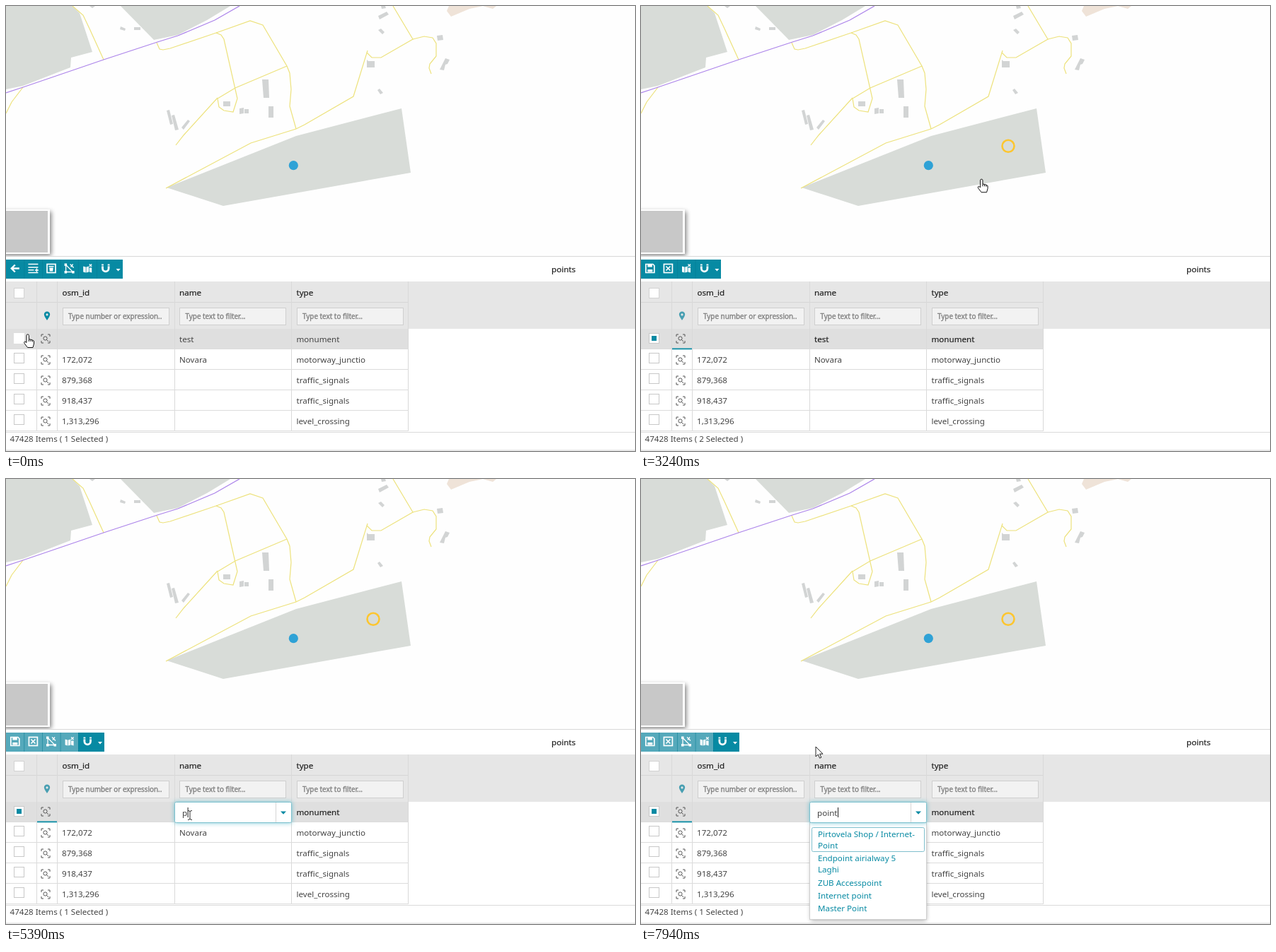
Animation of 889x630 px, one loop 8000 ms. Source, as an HTML page:

```html
<!DOCTYPE html>
<html lang="en">
<head>
<meta charset="utf-8">
<title>Points table</title>
<style>
html, body { margin: 0; width: 100%; height: 100%; overflow: hidden; background: #fefefe; }
svg { display: block; }
text { font: 11.6px "Noto Sans", "Open Sans", sans-serif; fill: #444; white-space: pre; }
.dark { fill: #222; stroke: #222; stroke-width: .2px; }
.hint { font-size: 9.9px; fill: #808080; stroke: #808080; stroke-width: .35px; }
.tip { font-size: 10px; fill: #fff; text-anchor: middle; }
.teal { fill: #078aa3; }
.land { fill: #d8dcd8; }
.house { fill: #d2d4d4; }
.road { fill: none; stroke: #ede27c; stroke-width: 1.2; }
.icon { fill: none; stroke: #fff; stroke-width: 1.7; }
.icon .solid { fill: #fff; stroke: none; }
</style>
</head>
<body>
<svg width="889" height="630" viewBox="0 0 889 630">
<defs>
  <filter id="blur" x="-50%" y="-50%" width="200%" height="200%"><feGaussianBlur stdDeviation="3"/></filter>
</defs>
<g id="base"></g>
<g id="live"></g>
</svg>
<script>
const LOOP = 8000, TEAL = '#078aa3', PALE = '#55a9bb';
const base = document.getElementById('base');
const live = document.getElementById('live');

const rect = (x, y, w, h, fill, extra = '') =>
  `<rect x="${x}" y="${y}" width="${w}" height="${h}" fill="${fill}" ${extra}/>`;
const box = (x, y, w, h, fill, stroke) => rect(x + .5, y + .5, w - 1, h - 1, fill, `stroke="${stroke}"`);
const text = (x, y, s, cls = '') => `<text x="${x}" y="${y}" class="${cls}">${s}</text>`;
const path = (d, attrs) => `<path d="${d}" ${attrs}/>`;
const circle = (x, y, r, attrs) => `<circle cx="${x}" cy="${y}" r="${r}" ${attrs}/>`;
const at = (x, y, s, attrs = '') => `<g transform="translate(${x} ${y})" ${attrs}>${s}</g>`;
const between = (t, a, b) => t >= a && t < b;
const clamp = v => Math.max(0, Math.min(1, v));

// ---------- still parts ----------
const land = [
  'M0 0H94L104 10L122 65L92 73L91 87L24 113L0 118Z',
  'M162 0L209 48L243 41L284 20L317 0Z',
  'M227 257L410 184L559 145L572 236L307 283Z'
];
const roads = [
  'M0 152L8 136L24 115',
  'M94 0L109 13L118 32L138 76',
  'M213 52L217 61L222 62L232 60L297 38L345 21L363 27L397 85L401 95L403 118L401 142L410 174',
  'M297 38L304 41L308 47L327 131L321 150L308 148L301 143L299 131L324 116L397 85',
  'M240 197L251 183L299 130',
  'M226 258L346 194L410 174L422 168L491 128L511 63',
  'M510 66L517 73H530L575 47L547 0',
  'M575 47L591 43L603 45L608 53V71L599 82L598 88L601 96'
];
const houses = 'M362 104h9l1 26h-8zM307 135h10v7h-10zM330 145l6-1v8l-6 1zM337 146h6v6h-6z' +
  'M371 142h7v16h-7zM227 148l4-1 5 20-4 1zM234 155l4-1 6 21-5 1zM257 161l3 2-9 12-3-3z' +
  'M162 29l7 3-1 3-7-2zM181 30h9v4h-9zM118 0h8l-4 3zM510 76l2 2h9v9h-11zM525 119l3-2 5 6-4 2z' +
  'M526 14l12-6 3 4-13 7zM530 0h6l1 3-6 1zM526 34l4-2 5 5-3 3zM609 42l8-1 1 7-8 1z' +
  'M621 74l6 2-3 6-3 1-2 8-6-1z';

const zoomIcon = (x, y) => at(x, y,
  path('M-6-3V-6H-3M3-6H6V-3M6 3V6H3M-3 6H-6V3M1.4 1.4L4 4', '') + circle(-.5, -.5, 2.6, ''),
  'fill="none" stroke="#555"');

function still() {
  let s = land.map(d => path(d, 'class="land"')).join('');
  s += path('M623 7L629 15L655 4L674 0L688 4L693 0H626Z', 'fill="#efe3d8"');
  s += path(houses, 'class="house"');
  s += roads.map(d => path(d, 'class="road"')).join('');
  s += path('M0 123L24 115L138 76L214 51L243 42L295 20L330 0', 'fill="none" stroke="#ac84ea" stroke-width="1.3"');
  s += rect(-4, 291, 68, 62, '#000', 'opacity=".5" filter="url(#blur)"');
  s += rect(0, 288, 62, 63, '#fff') + rect(0, 290, 59, 59, '#c8c8c8');

  s += rect(0, 354, 889, 276, '#fff') + rect(0, 354, 889, 1, '#d8d8d8');
  s += text(771, 377, 'points', 'dark');
  s += rect(0, 390, 889, 67, '#e6e6e6') + rect(0, 457, 569, 29, '#dfdfdf');
  s += rect(0, 419, 569, 1, '#d6d6d6');
  for (const x of [43, 72, 238, 403, 568]) s += rect(x, 390, 1, 212, '#d9d9d9');
  for (let y = 485; y < 603; y += 29) s += rect(0, y, 569, 1, '#dcdcdc');
  s += box(11, 399, 15, 15, '#fff', '#d2d2d2');
  [[80, 'osm_id', 'Type number or expression..'], [245.5, 'name', 'Type text to filter...'],
   [411, 'type', 'Type text to filter...']].forEach(([x, title, hint]) => {
    s += text(x - .5, 410, title, 'dark');
    s += box(Math.floor(x), 427, 151, 25, '#f2f2f2', '#cfcfcf') + text(x + 8, 443, hint, 'hint');
  });
  [['172,072', 'Novara', 'motorway_junctio'], ['879,368', '', 'traffic_signals'],
   ['918,437', '', 'traffic_signals'], ['1,313,296', '', 'level_crossing']].forEach((row, i) => {
    const y = 505 + 29 * i;
    [79, 245, 410.5].forEach((x, k) => s += text(x, y, row[k]));
    s += box(11, y - 14, 15, 15, '#fff', '#c8c8c8') + zoomIcon(56, y - 4);
  });
  s += zoomIcon(56, 471);
  s += rect(0, 603, 889, 1, '#dadada') + rect(0, 628, 889, 2, '#e9e9e9');
  return s;
}

// ---------- toolbar ----------
const icons = {
  back: path('M6 0H-5M0-5L-5 0L0 5', 'stroke-width="2.4"'),
  add: path('M-7-6H7M-7-1.5H7M-7 6H7M-7 2.3H1M5 0V5M2.5 2.5H7.5', 'stroke-width="1.5"'),
  trash: rect(-6, -6, 12, 12, 'none') + path('M-3.5-3.5H3.5V-2H-3.5ZM-2.8-1H2.8L2.2 4H-2.2Z', 'class="solid"'),
  shape: path('M-5-5V5H5L-5-5M1-6L6-1M5-6L2-2', 'stroke-width="1.3"') +
    path('M-7-7h3.5v3.5h-3.5zM-7 3.5h3.5V7h-3.5zM3.5 3.5H7V7H3.5z', 'class="solid"'),
  map: path('M-6-3L-2.5-2V6L-6 5ZM-1.7-2L1.7-3V5L-1.7 6ZM2.5-1H6V6L2.5 5Z', 'class="solid"') +
    path('M2.5-6L6-2.5M6-6L2.5-2.5', 'stroke-width="1.3"'),
  magnet: path('M-4.3-6V0A4.3 4.3 0 0 0 4.3 0V-6', 'stroke-width="2.8"') +
    path('M-6-3.6H-2.5M2.5-3.6H6', `stroke="${TEAL}" stroke-width="1"`),
  save: path('M-6-6H4L6-4V6H-6Z', '') + path('M-3.5-6H3V-2H-3.5ZM-3.5 1.5H3.5V5H-3.5Z', 'class="solid"'),
  close: rect(-6, -6, 12, 12, 'none') + path('M-3-3L3 3M3-3L-3 3', '')
};

function toolbar(names, pale) {
  const end = names.length * 25.6, w = Math.round(end + 11);
  let s = rect(0, 359, w, 27, TEAL);
  if (pale) s += rect(0, 359, end - 26, 27, PALE);
  for (let i = 1; i < names.length; i++) s += rect(i * 25.6, 359, .5, 27, '#067a91');
  s += names.map((n, i) => at(12.8 + i * 25.6, 371.5, icons[n], 'class="icon"')).join('');
  return s + path(`M${end + 2} 372h6l-3 3.5z`, 'fill="#fff"');
}

function toolsAt(t) {
  if (t < 470) return toolbar(['back', 'add', 'trash', 'shape', 'map', 'magnet']);
  if (t < 2880) return toolbar(['back', 'add', 'trash', 'map', 'magnet']);
  if (t < 4660) return toolbar(['save', 'close', 'map', 'magnet']);
  return toolbar(['save', 'close', 'shape', 'map', 'magnet'], true);
}

// ---------- pointer ----------
const track = [
  [70, 31, 465], [240, 18, 467], [1020, 18, 467], [1250, 330, 300], [1400, 480, 220],
  [1490, 454, 214], [1820, 406, 224], [2080, 406, 224], [2440, 508, 200], [2570, 519, 196],
  [3170, 519, 196], [3500, 345, 425], [3770, 288, 468], [3910, 270, 489], [3980, 270, 489],
  [4260, 258, 476], [7600, 258, 476], [7900, 247, 379]
];
function pointer(t) {
  const i = track.findIndex(k => k[0] > t);
  if (i === 0) return track[0].slice(1);
  if (i < 0) return track[track.length - 1].slice(1);
  const [a, x, y] = track[i - 1], [b, u, v] = track[i], p = (t - a) / (b - a);
  return [x + (u - x) * p, y + (v - y) * p];
}

const hand = path('M-2 9V1.6A1.7 1.7 0 0 1 1.4 1.6V6.8L4 7.2L6.5 8L8.5 9.3V13L7 18.5H-.5L-5 12.6Q-6 10.3-4.3 10L-2 11.5ZM1.4 7V10M4 7.5V10M6.4 8.3V10.5',
  'fill="#fff" stroke="#111" stroke-linejoin="round"');
const arrow = path('M0 0V14L3.3 11L5.6 16.2L7.8 15.2L5.6 10.2H10Z', 'fill="#fff" stroke="#222"');
const beam = path('M-3-6.5Q0-6.5 0-5Q0-6.5 3-6.5M0-5V5M-3 6.5Q0 6.5 0 5Q0 6.5 3 6.5', 'fill="none" stroke="#333"');

const presses = [[240, 340], [2020, 2570], [4460, 4540], [4600, 4660]];
function cursor(t) {
  const [x, y] = pointer(t);
  let s = '';
  if (presses.some(p => between(t, ...p)))
    s += circle(x, y + (t > 4000 ? -3 : 1), 9.5, 'fill="#f2e92a" opacity=".72"');
  const editing = t >= 4660;
  if (editing && y > 457) return s + at(x + 2, y, beam);
  return s + at(x, y, editing ? arrow : hand);
}

// ---------- map points ----------
function points(t) {
  const dot = circle(406.3, 225.7, 6.6, `fill="#2fa2d6"`);
  if (t < 540) return dot;
  const ring = (x, y, fill) => circle(x, y, 8.5, `fill="${fill}" stroke="#fdc62f" stroke-width="2.6"`);
  if (t >= 2880) return dot + ring(519, 198.3, 'none');
  if (t < 2080) return ring(405.7, 228, 'rgba(255,255,255,.7)') + circle(406.3, 226.5, 6.4, 'fill="#45a9dc"');
  const [x, y] = pointer(t - 40);
  return dot + ring(x, y + 2, 'rgba(255,255,255,.55)') +
    circle(x, y + 2, 4.6, 'fill="#1d8fe6" stroke="#fff" stroke-width="1.2"');
}

// ---------- cell editor ----------
const word = 'point', strokes = [5390, 5530, 5740, 5920, 6080];
const options = [[507, 'Pirtovela Shop / Internet-'], [523, 'Point'], [541, 'Endpoint airialway 5'],
  [557, 'Laghi'], [576, 'ZUB Accesspoint'], [594, 'Internet point'], [612, 'Master Point']];

function spinner(t) {
  let s = '';
  const lead = Math.floor(t / 80) % 8;
  for (let i = 0; i < 8; i++) {
    const a = (lead - i) * Math.PI / 4;
    s += circle(391 + 4 * Math.cos(a), 472 + 4 * Math.sin(a), 1.4, `fill="#333" opacity="${1 - i / 8}"`);
  }
  return s;
}

function editor(t) {
  const typed = word.slice(0, strokes.filter(k => t >= k).length);
  const busy = between(t, 5460, 6300) || between(t, 7080, 7300);
  const open = t >= 5460, bottom = busy ? 517 : 624;
  let s = '';
  if (open) {
    s += rect(240, 490, 163, bottom - 489, '#000', 'opacity=".35" filter="url(#blur)"');
    s += box(238, 486, 166, bottom - 486, '#fff', '#cfcfcf');
    if (busy) s += text(249, 506, 'No results', 'teal');
    else {
      s += rect(241.5, 493.5, 159, 34, '#fff', 'rx="2" stroke="#7fbfcd"');
      s += options.map(([y, label]) => text(250, y, label, 'teal')).join('');
    }
  }
  s += rect(238, 457, 166, 30, '#46b4c8', 'opacity=".7" filter="url(#blur)"');
  s += rect(238.5, 457.5, 165, 29, '#fff', 'rx="2" stroke="#7cc0cd"') + rect(381, 458, 1, 28, '#d5d5d5');
  if (typed) {
    const w = [0, 7.1, 14.1, 17.1, 24.3, 28.5][typed.length];
    s += text(249, 476.5, typed) + rect(249.5 + w, 465, 1, 14, '#222');
  } else {
    s += rect(249, 464, 20.5, 16, '#3390ff') + `<text x="249" y="476.5" style="fill:#fff">test</text>`;
  }
  return s + (busy ? spinner(t) : path('M388 470.5h8l-4 4.2z', `fill="${TEAL}"`));
}

function tooltip(t) {
  const show = (a, b) => clamp((t - a) / 70) * clamp((b - t) / 70);
  const o = Math.max(show(3500, 3880), show(7660, 7900));
  if (!o) return '';
  return `<g opacity="${o}">` + path('M238 388H404V420H326L321 424.5L316 420H238Z', 'fill="#000" opacity=".27"') +
    text(321, 400, 'Quick search is not available in', 'tip') + text(321, 414, 'edit mode', 'tip') + '</g>';
}

// ---------- whole picture ----------
function scene(t) {
  const checked = t >= 330, edit = t >= 2880, editing = t >= 4660;
  const count = checked && !editing ? 2 : 1;
  let s = points(t) + toolsAt(t);
  s += path('M58 445Q53.8 439 53.8 436.8A4.2 4.2 0 0 1 62.2 436.8Q62.2 439 58 445ZM58 435.3A1.6 1.6 0 1 0 58 438.5A1.6 1.6 0 1 0 58 435.3Z',
    `fill="${edit ? '#489fb2' : TEAL}" fill-rule="evenodd"`);
  s += checked ? box(11, 463, 15, 15, '#fff', '#c8c8c8') + rect(15, 467, 7, 7, TEAL) : rect(11, 463, 15, 15, '#fff');
  const cls = checked ? 'dark' : '';
  s += text(245, 476, 'test', cls) + text(410.5, 476, 'monument', cls);
  if (edit) s += rect(44, 484.5, 28, 1.8, TEAL);
  if (between(t, 3850, 4120)) s += rect(0, 486, 569, 28, '#000', 'opacity=".07"');
  s += text(5.5, 617, `47428 Items ( ${count} Selected )`);
  if (editing) s += editor(t);
  return s + tooltip(t) + cursor(t);
}

base.innerHTML = still();
function frame() {
  live.innerHTML = scene(performance.now() % LOOP);
  requestAnimationFrame(frame);
}
frame();
</script>
</body>
</html>
```
